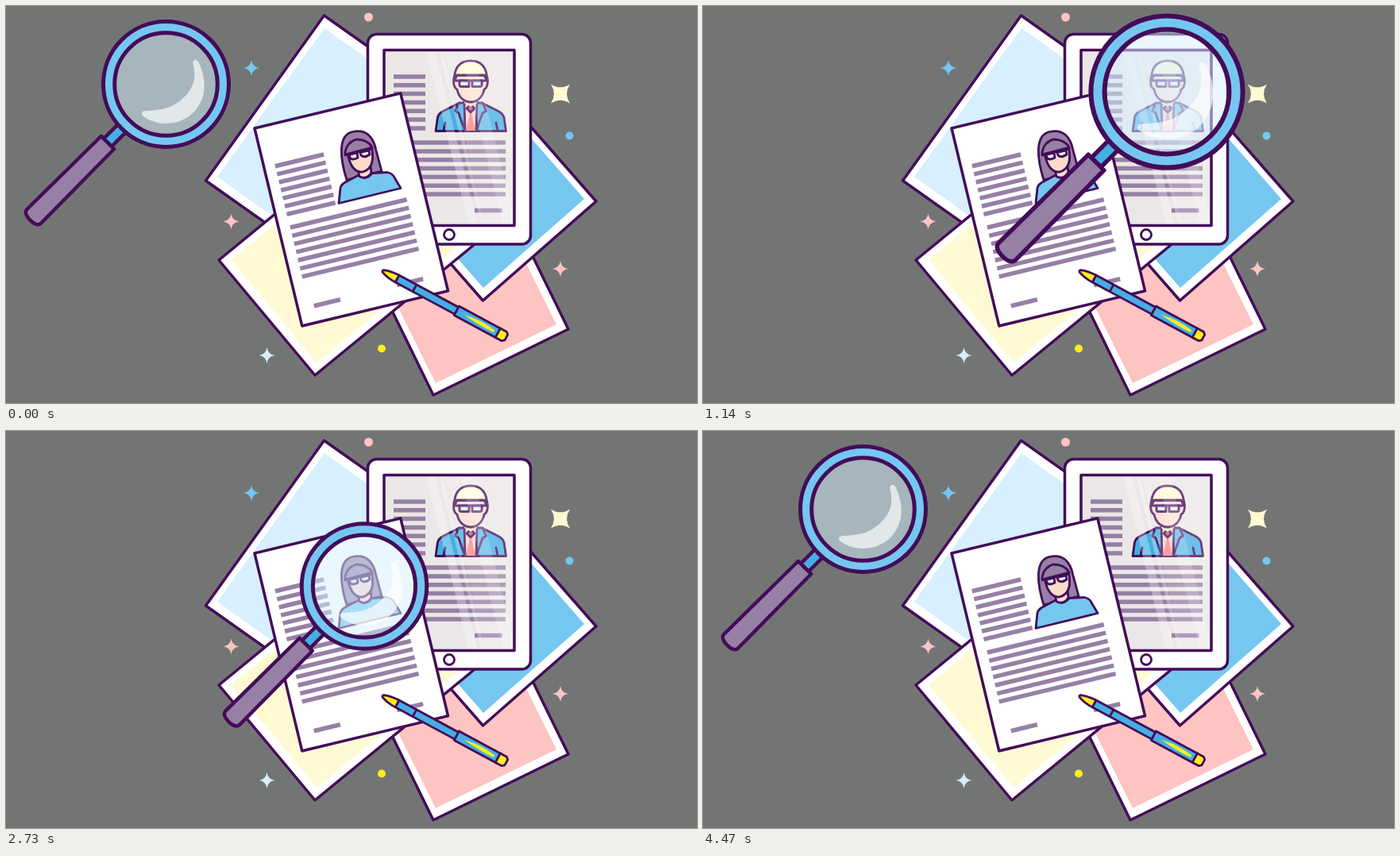
Write an HTML page that moves like this. It is 870 px wide and 500 px high and loops after 4500 ms.

```html
<!DOCTYPE html>
<html lang="en">
<head>
<meta charset="utf-8">
<title>Reviewing profiles</title>
<style>
  html, body { margin: 0; width: 100%; height: 100%; overflow: hidden; background: #737574; }
  svg { display: block; width: 870px; height: 500px; }
  .ink { stroke: #430c58; stroke-width: 3.5; stroke-linejoin: round; stroke-linecap: round; }
  .thin { stroke-width: 2.8; }
  .rows { stroke: #9680a5; fill: none; }
  .white { fill: #fff; }
  .sky { fill: #75c7f0; }
  .blue { fill: #45aee2; }
  .ice { fill: #d7efff; }
  .cream { fill: #fffad3; }
  .pink { fill: #fec4c2; }
  .skin { fill: #fbdccb; }
  .mauve { fill: #9680a5; }
  .yellow { fill: #ffed1c; }
  .none { fill: none; }
</style>
</head>
<body>
<svg viewBox="0 0 870 500">
  <defs>
    <path id="star" d="M0-10Q1.2-1.2 10 0Q1.2 1.2 0 10Q-1.2 1.2-10 0Q-1.2-1.2 0-10Z"/>
    <clipPath id="screen"><path d="M478 58h160v217H478z"/></clipPath>
  </defs>

  <!-- loose sheets -->
  <path class="ink white" d="M538 490L708 407 640 268 470 351Z"/>
  <path class="pink" d="M541 475L693 401 630 274 478 348Z"/>
  <path class="ink white" d="M743 246L600.5 371 480.5 234 623 109Z"/>
  <path class="sky" d="M728 243L601 355 490 228 617 116Z"/>
  <path class="ink white" d="M400.5 12L251.5 220 400 325 549 117Z"/>
  <path class="ice" d="M401 28L266 215 398 309 533 122Z"/>
  <path class="ink white" d="M268 320L389 465 600 292 479 147Z"/>
  <path class="cream" d="M284 320L391 449 590 285 483 156Z"/>

  <!-- tablet -->
  <rect class="ink white" x="455.5" y="35.5" width="205" height="264.5" rx="11"/>
  <rect x="476" y="55.5" width="164" height="221" fill="#ebe7e6"/>
  <g class="rows">
    <path d="M508 86.2v70.6" stroke-width="40" stroke-dasharray="5.5 5.33"/>
    <path d="M558.5 169.3v70.5" stroke-width="141" stroke-dasharray="5.5 5.33"/>
    <path d="M590 257.5h34.5" stroke-width="5.5"/>
  </g>
  <g class="ink thin">
    <path class="blue" d="M541 157.5L543.500 140Q545 135 551 132L571 122H599L619 132Q625 135 627 140L629.500 157.500Z"/>
    <path d="M576 121L579 157H591L594 121Z" fill="#f6cfcb" stroke="none"/>
    <path d="M585 132L579 157H591Z" fill="#f98385" stroke="none"/>
    <path class="none" d="M570 122L565.500 132 570 135 578 157M600 122L604.500 132 600 135 592 157M577 121L578 157M593 121L592 157M553 147L551 157M617 147L619 157"/>
    <path d="M585 124L590 129 585 134 580 129Z" fill="#c5606d"/>
    <path class="skin" d="M577 112V122L585 127 593 122V112Z" stroke="none"/>
    <path class="skin" d="M566 86C562 91 563 103 568 105C570 116 578 121 585 121S600 116 602 105C607 103 608 91 604 86Z"/>
    <path class="cream" d="M564.500 94C564 78 571 69 585 69S606 78 605.500 94L602 87H568Z"/>
    <path class="none" d="M567 87.500H603M566 94H604"/>
    <path class="ice" d="M571 94H583V101.500H573Q571 101.500 571 99ZM587 94H599V99Q599 101.500 597 101.500H587Z"/>
  </g>
  <g clip-path="url(#screen)" fill="#fff">
    <path d="M552 56H640V277H604Z" opacity=".22"/>
    <path d="M529 56H540L594 277H583ZM545 56H550L604 277H599Z" opacity=".3"/>
    <path d="M572 56H588L642 277H626Z" opacity=".18"/>
  </g>
  <rect class="ink none" x="476" y="55.5" width="164" height="221"/>
  <circle class="ink white thin" cx="558" cy="288" r="6.500"/>

  <!-- printed profile -->
  <g transform="translate(313 154) rotate(-13.5)">
    <path class="ink white" d="M0 0H189V256H0Z"/>
    <g class="rows">
      <path d="M45.500 49.700v68" stroke-width="63" stroke-dasharray="5.5 4.9"/>
      <path d="M90 129.300v69.200" stroke-width="151" stroke-dasharray="5.5 5.1"/>
      <path d="M20.500 235h34M128 234h34" stroke-width="5.500"/>
    </g>
  </g>
  <g class="ink thin">
    <path class="mauve" d="M429 219C421 194 417 163 436 158.500C454 154 463 166 466 182L473 208Z"/>
    <path class="skin" d="M443 205L445 215Q454 219 460 210L459 201Z"/>
    <path class="skin" d="M430 184C432 200 439 210 449 209C460 206 464 195 460 177Z"/>
    <path class="mauve" d="M427 187C427 176 434 170 441 168C450 168 457 171 461 178Z"/>
    <path class="none" d="M427 188L461 180"/>
    <path class="ice" d="M432 187.500L442 185 443 191Q435 195 433 191ZM446 184.500L457 182 458 187Q451 192 447 188Z"/>
    <path class="sky" d="M419 248.500L421 229Q422 225 427 222L443 213.500Q453 221 461 210.500L480 209.500Q487 211 489 216L497 229.500Z"/>
  </g>

  <!-- pen -->
  <g class="ink thin" transform="translate(474 333.5) rotate(28.3)">
    <path class="blue" d="M21-5H107V5H21Z"/>
    <path class="yellow" d="M1-1.500Q10-5 21-5V5Q10 5 1 1.500Q-1 0 1-1.500Z"/>
    <path class="none" d="M46-5V5"/>
    <path class="blue" d="M106-6.500H166V6.500H106Z"/>
    <path class="yellow" d="M117 0Q140-5 160-1V2Q140 3 117 0Z" stroke="none"/>
    <path class="yellow" d="M165-6.500H174L177-4V4L174 6.500H165Z"/>
  </g>

  <!-- sparkles -->
  <use href="#star" class="sky" x="309" y="78"/>
  <use href="#star" class="pink" x="283.5" y="271.5"/>
  <use href="#star" class="pink" x="698" y="331"/>
  <use href="#star" class="ice" x="328.5" y="440"/>
  <path class="cream" transform="translate(698 110.5) rotate(45)" d="M0-17Q3-3 17 0Q3 3 0 17Q-3 3-17 0Q-3-3 0-17Z"/>
  <circle class="pink" cx="456.5" cy="14" r="5.5"/>
  <circle class="sky" cx="709.5" cy="163.5" r="5"/>
  <circle class="yellow" cx="473" cy="431.5" r="5"/>

  <!-- magnifier, centred on its lens -->
  <g id="magnifier">
    <g class="ink" transform="rotate(135)" style="stroke-width:4.5">
      <path class="blue" d="M76-7H104V7H76Z"/>
      <path class="mauve" d="M104-11.500H108L236-12.500Q242-11 242 0T236 12.500L108 11.500H104Z"/>
    </g>
    <path class="sky" fill-rule="evenodd" d="M-79 0a79 79 0 1 0 158 0a79 79 0 1 0-158 0ZM-65 0a65 65 0 1 0 130 0a65 65 0 1 0-130 0Z"/>
    <circle class="ice" r="65" opacity=".52"/>
    <path class="white" opacity=".68" d="M33.500-27Q36-34 41-28C53-2 50 22 32 38C14 53-12 53-29 40Q-33 35-27 33.500C-5 33 8 30 21 18C37 4 38-12 33.500-27Z"/>
    <g class="ink none" style="stroke-width:5"><circle r="79"/><circle r="64.8"/></g>
  </g>
</svg>
<script>
  const LOOP = 4500, STEP = 30;
  // time, x, y, scale; linear between stops
  const stops = [
    [0, 201.5, 98.5, 1],
    [1080, 584, 108, 1.21],
    [1290, 584, 108, 1.21],
    [2070, 451, 195.5, 1.12],
    [3270, 451, 195.5, 0.896],
    [4470, 201.5, 98.5, 1],
    [4500, 201.5, 98.5, 1]
  ];
  const magnifier = document.getElementById('magnifier');

  function draw() {
    const t = Math.floor(performance.now() % LOOP / STEP) * STEP;
    const i = stops.findIndex(stop => stop[0] > t);
    const a = stops[i - 1], b = stops[i];
    const k = (t - a[0]) / (b[0] - a[0]);
    const [, x, y, s] = a.map((v, j) => v + (b[j] - v) * k);
    magnifier.setAttribute('transform', `translate(${x} ${y}) scale(${s})`);
    requestAnimationFrame(draw);
  }
  draw();
</script>
</body>
</html>
```
